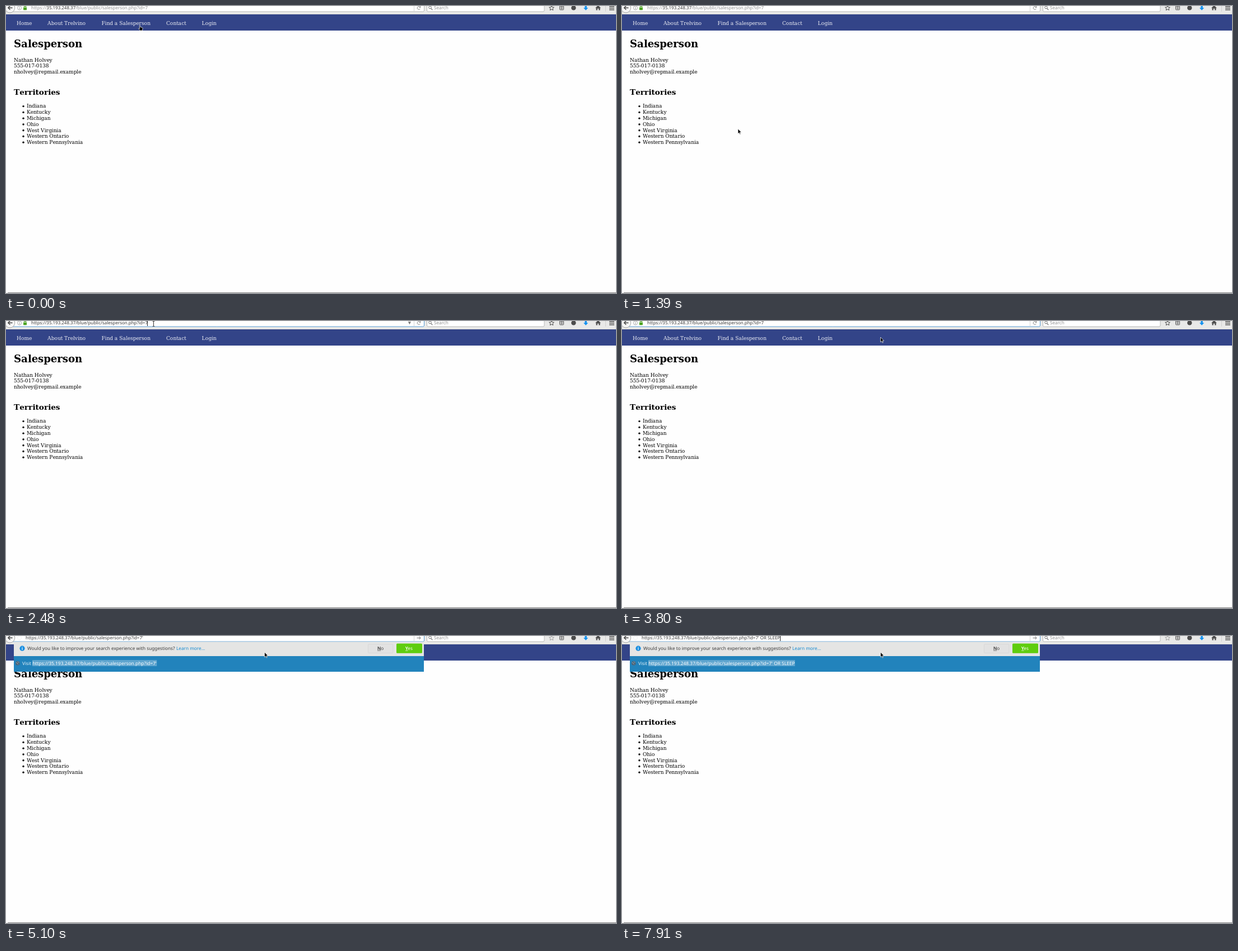
These frames come from a looping animation (1089x514 px, 8 s). An HTML page with a canvas:

```html
<!DOCTYPE html>
<html lang="en">
<head>
<meta charset="utf-8">
<title>Salesperson</title>
<style>
html, body { margin: 0; width: 100%; height: 100%; overflow: hidden; background: #fefefe; }
canvas { display: block; }
</style>
</head>
<body>
<canvas id="stage" width="1089" height="514"></canvas>
<script>
const ctx = document.getElementById('stage').getContext('2d');
const LOOP = 8000;
const K = 1089 / 1920; // text is laid out at desktop size, then scaled
const SCHEME = 'https://', HOST = '35.193.248.37', PATH = '/blue/public/salesperson.php?id=7';
const URL_TEXT = SCHEME + HOST + PATH;
const INK = '#4c4c4c';

const pointer = [
  [0, 'hand', 238, 35], [150, 'hand', 238, 38], [270, 'arrow', 232, 60], [390, 'arrow', 225, 95],
  [540, 'arrow', 218, 130], [660, 'arrow', 214, 160], [780, 'arrow', 211, 185],
  [900, 'arrow', 208, 205], [1020, 'arrow', 207, 218], [1390, 'arrow', 207, 220],
  [1760, 'arrow', 208, 200], [1880, 'arrow', 213, 160], [2000, 'arrow', 222, 115],
  [2120, 'arrow', 238, 70], [2240, 'arrow', 261, 28], [2360, 'beam', 262, 6],
  [2480, 'beam', 263.5, 5], [2630, 'arrow', 280.5, 9], [2880, 'beam', 283.5, 5],
  [3030, 'arrow', 390, 20], [3150, 'arrow', 461.5, 29]
];
const typing = [
  [0, ''], [3920, "'"], [6590, "' "], [7150, "' OR"], [7300, "' OR "],
  [7550, "' OR S"], [7670, "' OR SL"], [7790, "' OR SLE"], [7910, "' OR SLEEP"]
];

const latest = (keys, t) => keys.filter(k => k[0] <= t).pop();
const within = (t, a, b) => t >= a && t < b;

function rect(x, y, w, h, fill) {
  ctx.fillStyle = fill;
  ctx.fillRect(x, y, w, h);
}

function box(x, y, w, h, r, fill, stroke) {
  ctx.beginPath();
  ctx.roundRect(x, y, w, h, r);
  paint(fill, stroke, 1);
}

function paint(fill, stroke, width = 1) {
  if (fill) { ctx.fillStyle = fill; ctx.fill(); }
  if (stroke) { ctx.strokeStyle = stroke; ctx.lineWidth = width; ctx.stroke(); }
}

function poly(points, fill, stroke, width, open) {
  ctx.beginPath();
  points.forEach(([x, y]) => ctx.lineTo(x, y));
  if (!open) ctx.closePath();
  paint(fill, stroke, width);
}

function line(x1, y1, x2, y2, color, width = 1) {
  poly([[x1, y1], [x2, y2]], null, color, width, true);
}

function disc(x, y, r, fill, stroke, width) {
  ctx.beginPath();
  ctx.arc(x, y, r, 0, Math.PI * 2);
  paint(fill, stroke, width);
}

// Page text advances by whole desktop pixels.
function serif(text, x, y, color = '#000', size = 16, weight = 'normal') {
  ctx.save();
  ctx.translate(x, y);
  ctx.scale(K, K);
  ctx.font = `${weight} ${size}px "DejaVu Serif", serif`;
  ctx.fillStyle = color;
  let pen = 0;
  for (const c of text) {
    ctx.fillText(c, pen, 0);
    pen += Math.round(ctx.measureText(c).width);
  }
  ctx.restore();
}

// Browser interface text; returns its width on the stage.
function sans(text, x, y, color, size = 14.5) {
  ctx.save();
  ctx.translate(x, y);
  ctx.scale(K, K);
  ctx.font = `${size}px "Noto Sans", "Open Sans", sans-serif`;
  ctx.textRendering = 'geometricPrecision';
  ctx.fillStyle = color;
  ctx.fillText(text, 0, 0);
  const width = ctx.measureText(text).width * K;
  ctx.restore();
  return width;
}

function page() {
  rect(0, 0, 1089, 514, '#fefefe');
  rect(0, 15, 1089, 29, '#334488');
  const nav = [['Home', 19], ['About Trelvino', 74], ['Find a Salesperson', 170.6], ['Contact', 286], ['Login', 349.6]];
  nav.forEach(([label, x]) => serif(label, x, 33.7, '#eeeff5'));
  serif('Salesperson', 14, 73.6, '#000', 32, 'bold');
  ['Nathan Holvey', '555-017-0138', 'nholvey@repmail.example']
    .forEach((s, i) => serif(s, 14, 99.5 + i * 19 * K));
  serif('Territories', 14, 158.7, '#000', 24, 'bold');
  ['Indiana', 'Kentucky', 'Michigan', 'Ohio', 'West Virginia', 'Western Ontario', 'Western Pennsylvania']
    .forEach((s, i) => {
      const y = 182.4 + i * 19 * K;
      disc(31, y - 2.8, 1.7, '#000');
      serif(s, 37, y);
    });
  rect(3, 513, 1086, 1, '#808080');
}

function star(x, y, color) {
  const points = [];
  for (let i = 0; i < 10; i++) {
    const a = i * Math.PI / 5 - Math.PI / 2, r = i % 2 ? 2.1 : 4.6;
    points.push([x + r * Math.cos(a), y + r * Math.sin(a)]);
  }
  poly(points, null, color, 1);
}

function toolIcons(typed) {
  star(974, 3.8, typed ? '#a3a3a3' : INK);
  box(988.5, 0, 7, 6.8, 1, null, INK);
  line(990, 0.5, 994, 0.5, INK);
  line(990, 2.6, 994, 2.6, INK);
  line(990, 4.7, 994, 4.7, INK);
  disc(1013.3, 3.4, 4.2, INK);
  poly([[1033.4, -1], [1036.8, -1], [1036.8, 3.2], [1039.3, 3.2], [1035.1, 7.8], [1030.9, 3.2], [1033.4, 3.2]], '#1593f0');
  poly([[1057, -1], [1062, 3.6], [1060.5, 3.6], [1060.5, 7.4], [1058.2, 7.4], [1058.2, 4.4],
    [1055.8, 4.4], [1055.8, 7.4], [1053.5, 7.4], [1053.5, 3.6], [1052, 3.6]], INK);
  line(1070.5, 0, 1070.5, 10, '#cfcfcf');
  [0.3, 3.2, 6.1].forEach(y => rect(1077, y, 9, 1.4, INK));
}

function identity(typed) {
  if (typed) {
    ctx.setLineDash([1, 1.6]);
    disc(24, 3.4, 3.4, null, '#d0d0d0', 0.8);
    ctx.setLineDash([]);
    return;
  }
  disc(24, 3.4, 3.6, null, '#989898', 0.8);
  rect(23.5, 2.8, 1, 2.8, '#989898');
  rect(23.5, 1.2, 1, 1, '#989898');
  ctx.beginPath();
  ctx.arc(34, 2.2, 1.9, Math.PI, 0);
  paint(null, '#4da322', 1.2);
  box(31, 2.6, 6, 4.6, 0.7, '#4da322');
}

function toolbar(t, typed) {
  const focus = t >= 2360;
  rect(0, 0, 1089, 15, '#e9e9e8');
  rect(0, 14, 1089, 1, '#dcdcda');
  box(6, -8, 740.5, 18, 2, '#fff', focus ? '#5a9fd6' : '#b9b9b7');
  line(728.5, 0, 728.5, 9.5, '#d5d5d5');
  disc(7, 3.2, 8.8, '#f6f6f6', '#a5a5a3', 1);
  line(4, 3.3, 11.5, 3.3, INK, 1.6);
  poly([[7.4, -0.2], [3.8, 3.3], [7.4, 6.8]], null, INK, 1.6, true);
  identity(typed);

  if (typed) {
    line(733.5, 3.5, 740, 3.5, '#777');
    poly([[737.4, 0.8], [740.2, 3.5], [737.4, 6.2]], null, '#777', 1, true);
  } else {
    ctx.beginPath();
    ctx.arc(737, 3.5, 2.8, 0.5, 5.3);
    paint(null, '#858585', 1);
    poly([[740.3, -0.2], [740.3, 3], [737.2, 3]], '#858585');
  }
  if (within(t, 2360, 3030)) poly([[717.8, 1.3], [723, 1.3], [720.4, 6.3]], '#777');

  const x = typed ? 35 : 45, y = 6.3, size = 14;
  let end = x;
  if (focus) {
    end += sans(URL_TEXT + typed, x, y, '#3a3a3a', size);
  } else {
    [[SCHEME, '#8f8f8f'], [HOST, '#333'], [PATH, '#8f8f8f']]
      .forEach(([s, color]) => { end += sans(s, end, y, color, size); });
  }
  if (within(t, 2480, 3800) || within(t, 3920, 5100) || t >= 6310) rect(Math.floor(end), 0, 1, 9, '#222');

  box(751.5, -8, 209.5, 18, 2, '#fff', '#b9b9b7');
  disc(757, 2.5, 2.3, null, '#707070', 1);
  line(758.7, 4.3, 761.3, 7, '#707070', 1.2);
  sans('Search', 764, y, '#949494', 14.4);
  toolIcons(typed);
}

function accessKey(label, x, y, color) {
  const width = sans(label, x, y, color);
  const first = sans(label[0], x, y, color);
  line(x, y + 1.2, x + first, y + 1.2, color, 0.7);
  return width;
}

function suggestions(typed) {
  rect(14, 10.5, 732, 53.5, '#e5e5e4');
  disc(29, 22.2, 4.6, '#1b8fe0');
  rect(28.4, 21.4, 1.2, 3.4, '#fff');
  rect(28.4, 19.4, 1.2, 1.2, '#fff');
  sans('Would you like to improve your search experience with suggestions?', 38, 25, '#3b3b3b');
  sans('Learn more...', 304, 25, '#178bd0');
  box(646.5, 14.5, 44.5, 16, 1, '#e2e2e2', '#d8d8d8');
  accessKey('No', 663, 25, '#444');
  box(697, 13.5, 46, 17.2, 1.5, '#5fcd0e');
  accessKey('Yes', 713, 25, '#fff');

  rect(14, 36, 732, 28, '#2283bc');
  disc(20.8, 48.7, 3.8, '#4b6478');
  line(18, 47.2, 22, 50.6, '#9fb6c4', 0.9);
  line(20.5, 46, 23.5, 47.6, '#9fb6c4', 0.8);
  sans('Visit', 29, 51.5, '#e4f1f8');
  const text = URL_TEXT + typed.trimEnd();
  const width = sans(text, 47.3, 51.5, '#fff', 14.8);
  rect(47, 43, width + 0.6, 11, '#5fa5cf');
  sans(text, 47.3, 51.5, '#fff', 14.8);
}

const cursors = {
  arrow() {
    poly([[0, 0], [0, 8.8], [2, 7], [3.4, 10], [4.8, 9.4], [3.4, 6.5], [6.1, 6.3]], '#000', '#fff', 0.7);
  },
  hand() {
    ctx.lineJoin = 'round';
    poly([[0, 0.3], [1.4, 0], [2.2, 3], [5, 3.2], [6, 4.4], [5.6, 8.8], [2, 9.2], [-1.6, 5.6], [-0.8, 4.8], [0.8, 5.6]],
      '#000', '#fff', 0.7);
    ctx.lineJoin = 'miter';
  },
  beam() {
    line(0, -4.2, 0, 4.4, '#333', 1);
    line(-2, -4.5, 2, -4.5, '#333', 0.8);
    line(-2, 4.5, 2, 4.5, '#333', 0.8);
  }
};

function draw(t) {
  const typed = latest(typing, t)[1];
  page();
  toolbar(t, typed);
  if (typed) suggestions(typed);
  const [, kind, x, y] = latest(pointer, t);
  ctx.save();
  ctx.translate(x, y);
  cursors[kind]();
  ctx.restore();
}

const start = performance.now();
function tick() {
  draw((performance.now() - start) % LOOP);
  requestAnimationFrame(tick);
}
tick();
</script>
</body>
</html>
```
